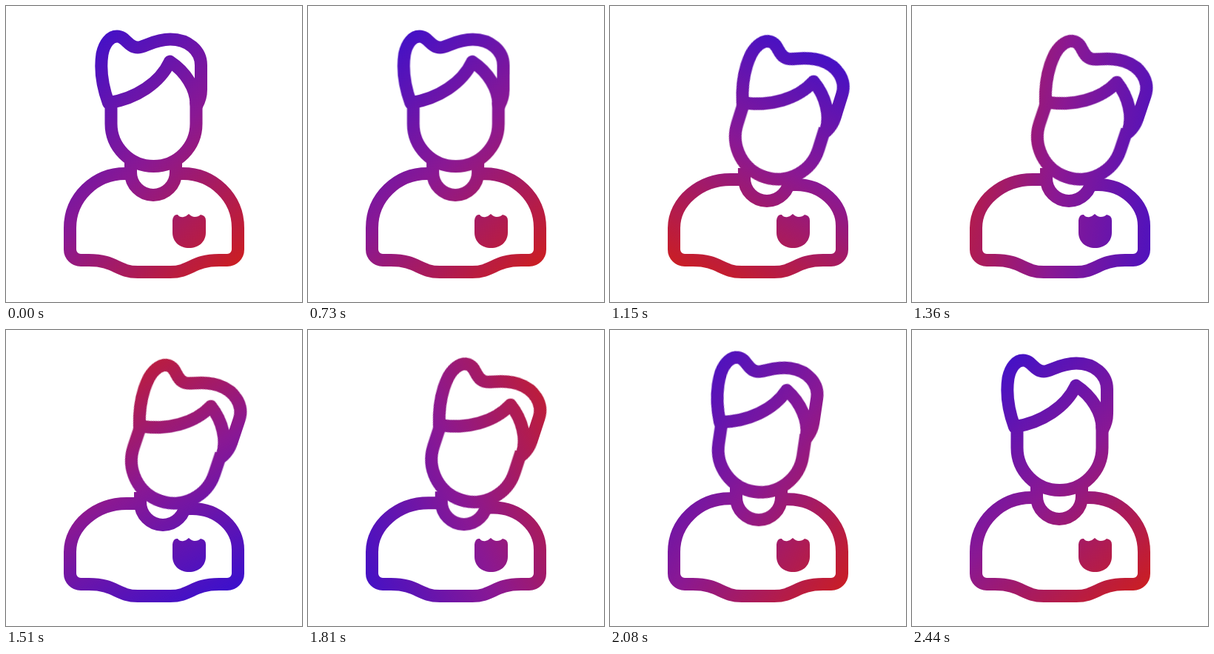
Write an HTML page that moves like this. It is 400 px wide and 400 px high and loops after 2470 ms.

```html
<!DOCTYPE html>
<html lang="en">
<head>
<meta charset="utf-8">
<title>Tilting head</title>
<style>
  html, body { margin: 0; width: 100%; height: 100%; overflow: hidden; background: #fff; }
  :root { --loop: 2470ms linear infinite; }

  .stage { position: relative; width: 400px; height: 400px; overflow: hidden; background: #fff; isolation: isolate; }
  svg { display: block; fill: none; stroke: #000; stroke-width: 17; stroke-linejoin: round; }

  /* Screen blending tints the black drawing and leaves white untouched. */
  .blend { position: absolute; inset: 0; overflow: hidden; mix-blend-mode: screen; }
  .tint {
    position: absolute; left: -100px; top: -100px; width: 600px; height: 600px;
    background: linear-gradient(90deg, #3c10cc 115px, #8a1893 300px, #cc1e20 492px);
    animation: spin var(--loop);
  }

  .face { fill: #fff; }
  .badge { fill: #000; stroke: none; }
  .body { animation: shrug var(--loop); }
  .collar { --x: 13px; --y: 8px; animation: shift var(--loop); }
  .head { --x: 27.5px; --y: 17.5px; animation: shift var(--loop); }
  .turn { transform-origin: 199.5px 159px; animation: turn var(--loop); }
  .hair { animation: sway var(--loop); }

  @keyframes spin {
    0%, 28.34% { transform: rotate(47deg); animation-timing-function: cubic-bezier(.37, 0, .63, 1); }
    91.09%, 100% { transform: rotate(407deg); }
  }
  @keyframes shift {
    0%, 28.34% { transform: translate(0, 0); animation-timing-function: cubic-bezier(.37, 0, .63, 1); }
    47.37%, 69.23% { transform: translate(var(--x), var(--y)); animation-timing-function: cubic-bezier(.37, 0, .63, 1); }
    89.47%, 100% { transform: translate(0, 0); }
  }
  @keyframes turn {
    0%, 28.34% { transform: rotate(0deg); animation-timing-function: cubic-bezier(.37, 0, .63, 1); }
    50.2%, 70.45% { transform: rotate(18.5deg); animation-timing-function: cubic-bezier(.4, 0, .45, 1); }
    100% { transform: rotate(0deg); }
  }
  @keyframes sway {
    0%, 28.34% { transform: translate(0, 0); animation-timing-function: cubic-bezier(.37, 0, .63, 1); }
    50.2%, 70.45% { transform: translate(2px, -1.5px); animation-timing-function: cubic-bezier(.4, 0, .45, 1); }
    100% { transform: translate(0, 0); }
  }
  @keyframes shrug {
    0%, 28.34%, 89.47%, 100% {
      d: path("M168 226.5 L161 226.5 C120 226.5 86.5 259 86.5 300 L86.5 329 A14.5 14.5 0 0 0 101 343.5 L112 343.5 C148 343.5 150 359.5 178 359.5 L222 359.5 C250 359.5 252 343.5 288 343.5 L299 343.5 A14.5 14.5 0 0 0 313.5 329 L313.5 300 C313.5 259 280 226.5 239 226.5 L232 226.5");
      animation-timing-function: cubic-bezier(.37, 0, .63, 1);
    }
    47.37%, 69.23% {
      d: path("M180 234.5 L163 234.5 C122 234.5 86.5 264 86.5 300 L86.5 329 A14.5 14.5 0 0 0 101 343.5 L112 343.5 C148 343.5 150 359.5 178 359.5 L222 359.5 C250 359.5 252 343.5 288 343.5 L299 343.5 A14.5 14.5 0 0 0 313.5 329 L313.5 297 C313.5 267 286 241.5 252 241.5 L244 241.5");
      animation-timing-function: cubic-bezier(.37, 0, .63, 1);
    }
  }
</style>
</head>
<body>
<div class="stage">
  <svg width="400" height="400" viewBox="0 0 400 400">
    <path class="body" d="M168 226.5 L161 226.5 C120 226.5 86.5 259 86.5 300 L86.5 329 A14.5 14.5 0 0 0 101 343.5 L112 343.5 C148 343.5 150 359.5 178 359.5 L222 359.5 C250 359.5 252 343.5 288 343.5 L299 343.5 A14.5 14.5 0 0 0 313.5 329 L313.5 300 C313.5 259 280 226.5 239 226.5 L232 226.5"/>
    <path class="badge" d="M225 290 Q226 281 232 282 Q235 286 240 285 Q244 284 247 281 Q251 285 255 285 Q260 285 263 282 Q270 283 270 290 V306 C270 319 260 327 247.5 327 C235 327 225 319 225 306 Z"/>
    <path class="collar" d="M168.5 211 V225 A30.5 30.5 0 0 0 229.5 225 V211"/>
    <g class="head">
      <g class="turn">
        <path class="face" d="M142 132 V159 A57.5 57.5 0 0 0 257 159 V130"/>
        <path class="hair" d="M257 133 C257 112 243 89 221.5 75 C208 104 176 125 138.5 131 C130 108 127 85 130 65 C133 50 141 41 150 41 C162 41 165 56 178 56 C187 56 200 45 222 45 C246 45 263.5 60 263.5 80 V113 Q263.5 124 258 134 Z"/>
      </g>
    </g>
  </svg>
  <div class="blend"><div class="tint"></div></div>
</div>
</body>
</html>
```
